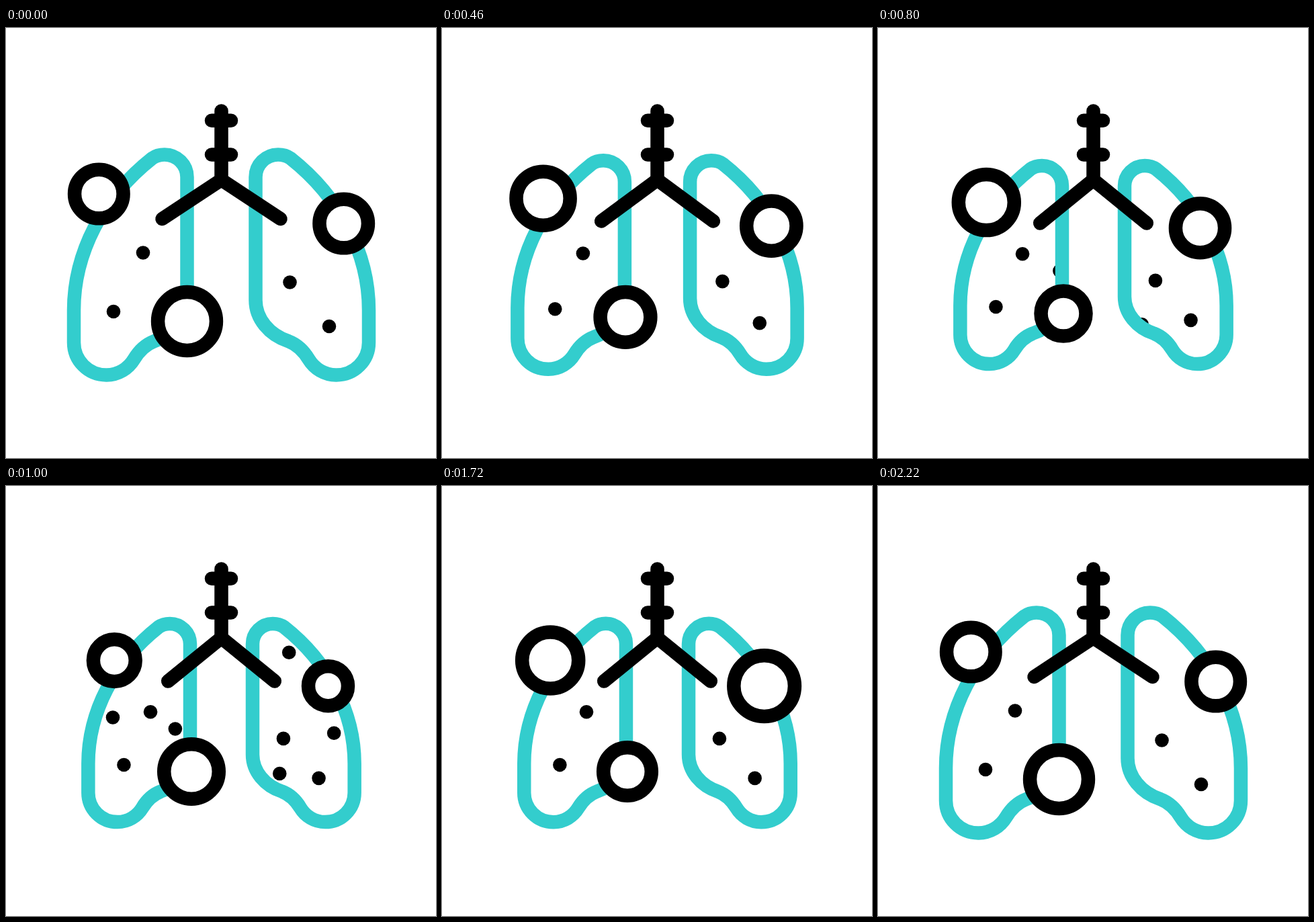
Recreate the animation shown at these times as an HTML page with a canvas. Size 640 by 640 pixels, loop 2.4 s.

```html
<!DOCTYPE html>
<html lang="en">
<head>
<meta charset="utf-8">
<title>Breathing lungs</title>
<style>
  html, body { margin: 0; width: 100%; height: 100%; overflow: hidden; background: #fff; }
  canvas { display: block; width: 100vmin; height: 100vmin; }
</style>
</head>
<body>
<canvas id="stage" width="640" height="640"></canvas>
<script>
const ctx = document.getElementById('stage').getContext('2d');
const LOOP = 2400, LINE = 20.5, MID = 320.5;
const TEAL = '#33cdcd', BLACK = '#000';
const BEATS = [200, 700, 1200, 1700, 2210];

// x, y at rest; x, y when exhaled; outer radius at each beat
const rings = [
  { from: [138.3, 247], to: [161.3, 259.6], r: [46.5, 53.7, 35.2, 52.3, 46.5] },
  { from: [502.7, 291], to: [479.5, 297.7], r: [46.5, 48.2, 35.2, 55.6, 46.5] },
  { from: [269.5, 436.5], to: [276, 425], r: [53.7, 42.3, 55.7, 46, 53.7] }
];
const dots = [[204, 334.5], [160, 422], [422.5, 378.5], [481, 444]];

// particles leave the wall (first pair) and drift to their farthest point (second pair)
const particles = [
  [131, 328.5, 174, 353],
  [274, 361.5, 240, 361.5],
  [443, 225, 409.5, 260],
  [390, 444, 416.5, 419.5],
  [522, 375.5, 470, 363.5]
];

const lerp = (a, b, p) => a + (b - a) * p;
const ease = u => { u = Math.min(1, Math.max(0, u)); return u * u * (3 - 2 * u); };
const ramp = (t, a, b) => ease((t - a) / (b - a));

function track(t, values) {
  let v = values[0];
  for (let i = 1; i < values.length; i++) {
    v += (values[i] - values[i - 1]) * ramp(t, BEATS[i - 1], BEATS[i]);
  }
  return v;
}

// shrink towards the inner point of each lung
function squeeze(x, y, k) {
  const cx = x < MID ? 314.5 : 326.5;
  return [cx + (x - cx) * k, 352.5 + (y - 352.5) * k];
}

function lung(side, k) {
  const p = new Path2D();
  const at = (...c) => {
    const out = [];
    for (let i = 0; i < c.length; i += 2) {
      const [x, y] = squeeze(c[i], c[i + 1], k);
      out.push(side > 0 ? x : 2 * MID - x);
    	out.push(y);
    }
    return out;
  };
  p.moveTo(...at(371.5, 405));
  p.lineTo(...at(371.5, 222));
  p.bezierCurveTo(...at(371.5, 203.5, 386.5, 188.5, 405, 188.5));
  p.bezierCurveTo(...at(412, 188.5, 418, 190, 423.5, 194));
  p.bezierCurveTo(...at(497, 252, 540, 335, 540, 420));
  p.lineTo(...at(540, 468));
  p.bezierCurveTo(...at(540, 495, 518.5, 516.5, 491.5, 516.5));
  p.bezierCurveTo(...at(474, 516.5, 459, 507, 450.5, 493));
  p.bezierCurveTo(...at(443, 480.5, 433, 471, 420, 466));
  p.bezierCurveTo(...at(392, 456.5, 371.5, 433, 371.5, 405));
  p.closePath();
  return p;
}

function dot(x, y) {
  ctx.beginPath();
  ctx.arc(x, y, 10.3, 0, 7);
  ctx.fill();
}

function line(...c) {
  ctx.beginPath();
  for (let i = 0; i < c.length; i += 2) ctx.lineTo(c[i], c[i + 1]);
  ctx.stroke();
}

function drawParticles(t, walls) {
  const p = ramp(t, 700, 1200) - ramp(t, 1260, 1720);
  if (p <= 0) return;
  const inside = new Path2D();
  walls.forEach(w => inside.addPath(w));
  ctx.save();
  ctx.clip(inside);
  for (const [x0, y0, x1, y1] of particles) dot(lerp(x0, x1, p), lerp(y0, y1, p));
  ctx.restore();
}

function drawAirway(e) {
  const reach = lerp(88, 79.3, e), y = lerp(284, 290.5, e);
  ctx.lineCap = 'round';
  ctx.lineJoin = 'miter';
  line(MID, 123.5, MID, 226);
  line(306, 137.8, 335, 137.8);
  line(306, 188.5, 335, 188.5);
  line(MID - reach, y, MID, 226, MID + reach, y);
}

function draw(t) {
  const e = ramp(t, BEATS[0], BEATS[1]) - ramp(t, BEATS[3], BEATS[4]);
  const k = 1 - 0.1 * e;
  const walls = [lung(-1, k), lung(1, k)];

  ctx.fillStyle = '#fff';
  ctx.fillRect(0, 0, 640, 640);
  ctx.lineWidth = LINE;

  ctx.fillStyle = BLACK;
  drawParticles(t, walls);

  ctx.strokeStyle = TEAL;
  ctx.lineJoin = 'miter';
  walls.forEach(w => ctx.stroke(w));

  ctx.strokeStyle = BLACK;
  drawAirway(e);
  for (const [x, y] of dots) dot(...squeeze(x, y, k));

  ctx.fillStyle = '#fff';
  for (const { from, to, r } of rings) {
    ctx.beginPath();
    ctx.arc(lerp(from[0], to[0], e), lerp(from[1], to[1], e), track(t, r) - LINE / 2, 0, 7);
    ctx.fill();
    ctx.stroke();
  }
}

const start = performance.now();
function tick() {
  draw((performance.now() - start) % LOOP);
  requestAnimationFrame(tick);
}
tick();
</script>
</body>
</html>
```
